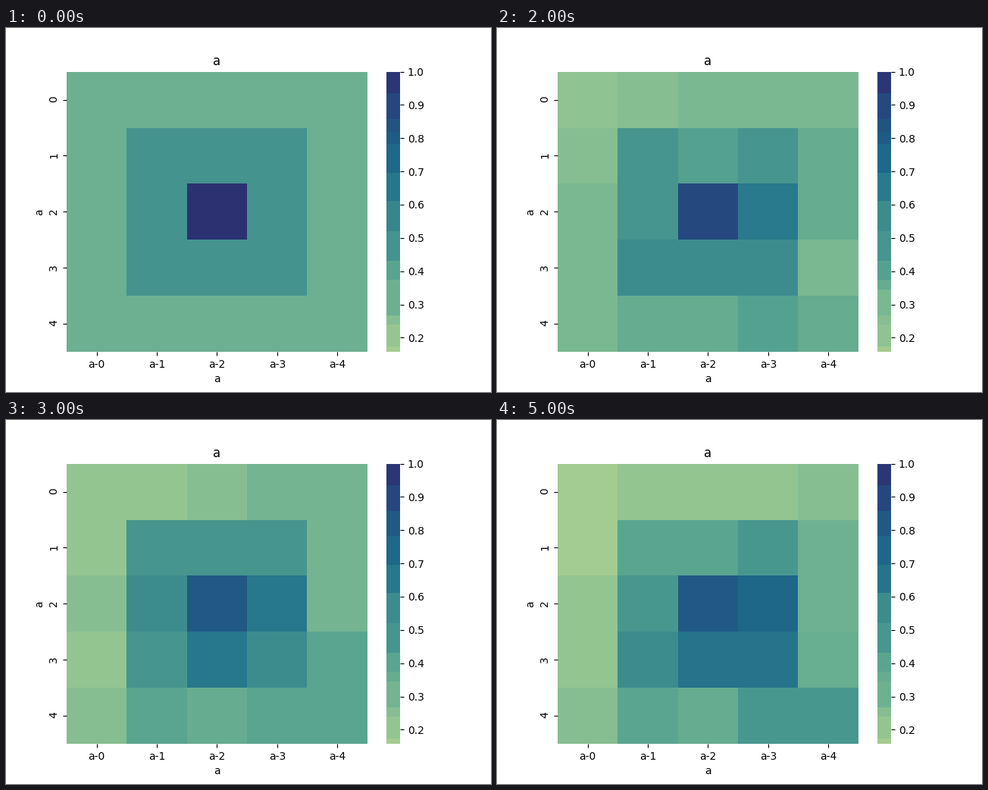
Recreate the animation shown at these times as a matplotlib script. Size 640x480 px, loop 6 s.

```python
import numpy as np
import matplotlib.pyplot as plt
from matplotlib.animation import FuncAnimation
from matplotlib.colors import LinearSegmentedColormap

plt.rcParams["font.family"] = "DejaVu Sans"
LOW, HIGH = 0.157, 1.0
SNAP = 0.031

CREST = LinearSegmentedColormap.from_list("crest", [
    "#a5cd90", "#7dba91", "#59a590", "#40908e",
    "#287a8c", "#1c6488", "#254b7f", "#2c3172"])

# Bounds of the colour bands in the bar
BANDS = np.array([LOW, .173, .239, .268, .344, .374, .431, .520,
                  .611, .695, .782, .816, .857, .935, HIGH])
MIDS = (BANDS[:-1] + BANDS[1:]) / 2


def rings():
    """Similarity that falls off with distance from the centre cell."""
    d = np.abs(np.arange(5) - 2)
    return 1 / (1 + np.maximum.outer(d, d))


STEPS = [
    rings(),
    np.array([[.310, .310, .310, .310, .310],
              [.310, .495, .495, .495, .360],
              [.310, .495, .910, .545, .360],
              [.310, .495, .545, .495, .360],
              [.310, .360, .310, .360, .310]]),
    np.array([[.225, .250, .290, .290, .290],
              [.250, .490, .420, .490, .360],
              [.290, .490, .885, .640, .360],
              [.290, .540, .540, .540, .290],
              [.290, .360, .360, .420, .360]]),
    np.array([[.210, .210, .250, .310, .310],
              [.210, .490, .490, .490, .310],
              [.250, .540, .810, .650, .310],
              [.210, .490, .650, .540, .395],
              [.250, .395, .355, .395, .395]]),
    np.array([[.200, .200, .250, .310, .310],
              [.200, .405, .490, .490, .360],
              [.200, .560, .830, .660, .310],
              [.200, .560, .560, .560, .360],
              [.250, .490, .400, .400, .400]]),
    np.array([[.165, .210, .210, .210, .250],
              [.165, .395, .395, .480, .330],
              [.210, .480, .810, .740, .330],
              [.210, .540, .670, .670, .350],
              [.250, .395, .355, .480, .480]]),
]


def band_values(cells):
    """Give each band the value of the closest cell, if one is near."""
    flat = cells.ravel()
    near = flat[np.abs(MIDS[:, None] - flat).argmin(axis=1)]
    return np.where(np.abs(near - MIDS) < SNAP, near, MIDS)


def hide_spines(axes):
    for spine in axes.spines.values():
        spine.set_visible(False)


fig = plt.figure(figsize=(6.4, 4.8), dpi=100, facecolor="white")

ax = fig.add_axes([0.125, 0.11, 0.62, 0.77])
style = dict(cmap=CREST, vmin=LOW, vmax=HIGH)
mesh = ax.pcolormesh(STEPS[0], **style)
ax.set(xlim=(0, 5), ylim=(5, 0), title="a", xlabel="a", ylabel="a")
ax.set_xticks(np.arange(5) + 0.5, [f"a-{i}" for i in range(5)])
ax.set_yticks(np.arange(5) + 0.5, [str(i) for i in range(5)], rotation=90)
hide_spines(ax)

bar = fig.add_axes([0.78375, 0.11, 18.48 / 640, 0.77])
bands = bar.pcolormesh([0, 1], BANDS, band_values(STEPS[0])[:, None], **style)
bar.set(xlim=(0, 1), ylim=(LOW, HIGH), xticks=[])
bar.yaxis.tick_right()
ticks = np.arange(2, 11) / 10
bar.set_yticks(ticks, [f"{t:.1f}" for t in ticks])
hide_spines(bar)


def update(i):
    cells = STEPS[i]
    mesh.set_array(cells)
    bands.set_array(band_values(cells)[:, None])
    return mesh, bands


anim = FuncAnimation(fig, update, frames=len(STEPS), interval=1000,
                     repeat=True, repeat_delay=0, blit=False)
plt.show()
```
